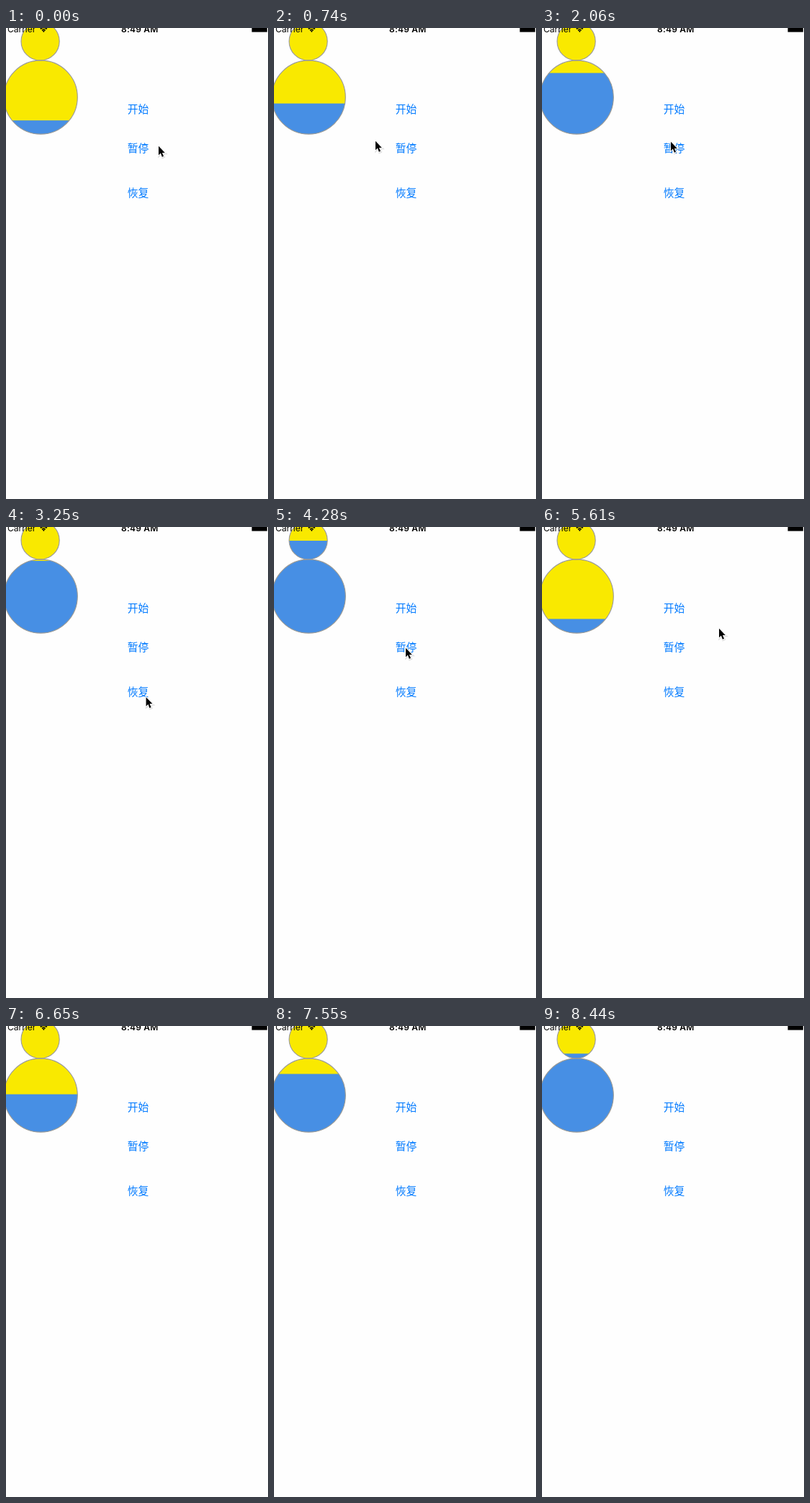
These frames come from a looping animation (364x653 px, 8560 ms). An HTML page:

```html
<!DOCTYPE html>
<html lang="zh">
<head>
<meta charset="utf-8">
<style>
  html, body { margin: 0; width: 100%; height: 100%; overflow: hidden; background: #fefefe; }
  svg { display: block; width: 364px; height: 653px; }
  .status { font: 12px Inter, "Liberation Sans", sans-serif; }
  .time { font-weight: 600; letter-spacing: .2px; text-anchor: middle; }
  .button { font: 14.8px "Noto Sans CJK SC", "Noto Sans CJK", sans-serif; fill: #007aff; text-anchor: middle; }
</style>
</head>
<body>
<svg viewBox="0 0 364 653">
  <defs>
    <clipPath id="body">
      <circle cx="47.6" cy="18.4" r="26.6"/>
      <circle cx="48.2" cy="96" r="51.1"/>
    </clipPath>
  </defs>
  <rect width="364" height="653" fill="#fefefe"/>
  <g clip-path="url(#body)">
    <rect x="-5" y="-10" width="110" height="160" fill="#f9e900"/>
    <rect id="water" x="-5" width="110" height="160" fill="#478fe4"/>
  </g>
  <g fill="none" stroke="#999" stroke-width="1.1">
    <circle cx="47.6" cy="18.4" r="26.6"/>
    <circle cx="48.2" cy="96" r="51.1"/>
  </g>

  <text class="status" x="2" y="5.6">Carrier</text>
  <g fill="none" stroke="#000" stroke-width="1.6">
    <path d="M47.8 1.4a6.2 6.2 0 0 1 9 0"/>
    <path d="M50 3.4a3.3 3.3 0 0 1 4.6 0"/>
  </g>
  <path d="M50.9 4.4a2 2 0 0 1 2.8 0L52.3 6z"/>
  <text class="status time" x="185.8" y="5.6">8:49 AM</text>
  <rect x="341.5" y="-3" width="21.3" height="8.6"/>

  <text class="button" x="183.5" y="118">开始</text>
  <text class="button" x="183.5" y="172">暂停</text>
  <text class="button" x="183.5" y="234">恢复</text>

  <g id="cursor">
    <path d="M.6 1.2V15L3.8 12 6 17.6 8.4 16.6 6.2 11.2H10.6z" fill="none" stroke="#000" stroke-opacity=".12" stroke-width="3"/>
    <path d="M0 0V13.9L3.2 10.9 5.4 16.6 7.8 15.6 5.5 10.1H9.8z" stroke="#fff" stroke-width="2" paint-order="stroke"/>
  </g>
</svg>
<script>
const LOOP = 8560, STEP = 147.6; // ms
const SPEED = 0.0318; // px per ms
const PAUSE = 2550, RESUME = 3400, RESTART = 4995, POINTER_GONE = 5700;

// pointer tip: time, x, y
const POINTER = [
  [0, 212, 163], [740, 141, 156], [2060, 179, 157], [2600, 182, 164],
  [3100, 199, 242], [3400, 190, 228], [4280, 183, 167], [4720, 184, 209],
  [5610, 246, 140]
];

const water = document.getElementById("water");
const cursor = document.getElementById("cursor");

// the screen refreshes in even steps, give or take a few ms
const snap = t => STEP * Math.floor(t / STEP + 0.06);

function level(t) {
  if (t >= RESTART) return 147 - SPEED * (t - RESTART);
  const run = Math.min(t, PAUSE) + Math.max(0, t - RESUME);
  return Math.max(16, 128.1 - SPEED * run);
}

function pointer(t) {
  const i = POINTER.findIndex(p => p[0] > t);
  if (i < 0) return POINTER[POINTER.length - 1].slice(1);
  const [t0, x0, y0] = POINTER[i - 1], [t1, x1, y1] = POINTER[i];
  const u = (t - t0) / (t1 - t0), k = u * u * (3 - 2 * u);
  return [x0 + (x1 - x0) * k, y0 + (y1 - y0) * k];
}

function draw(now) {
  const t = snap(now % LOOP);
  water.setAttribute("y", level(t).toFixed(2));
  const [x, y] = pointer(t);
  cursor.setAttribute("transform", `translate(${x.toFixed(1)} ${(y + 0.8).toFixed(1)}) scale(.9)`);
  cursor.setAttribute("visibility", t < POINTER_GONE ? "visible" : "hidden");
}

let start;
function tick(now) {
  start ??= now;
  draw(Math.max(0, now - start));
  requestAnimationFrame(tick);
}
draw(0);
requestAnimationFrame(tick);
</script>
</body>
</html>
```
